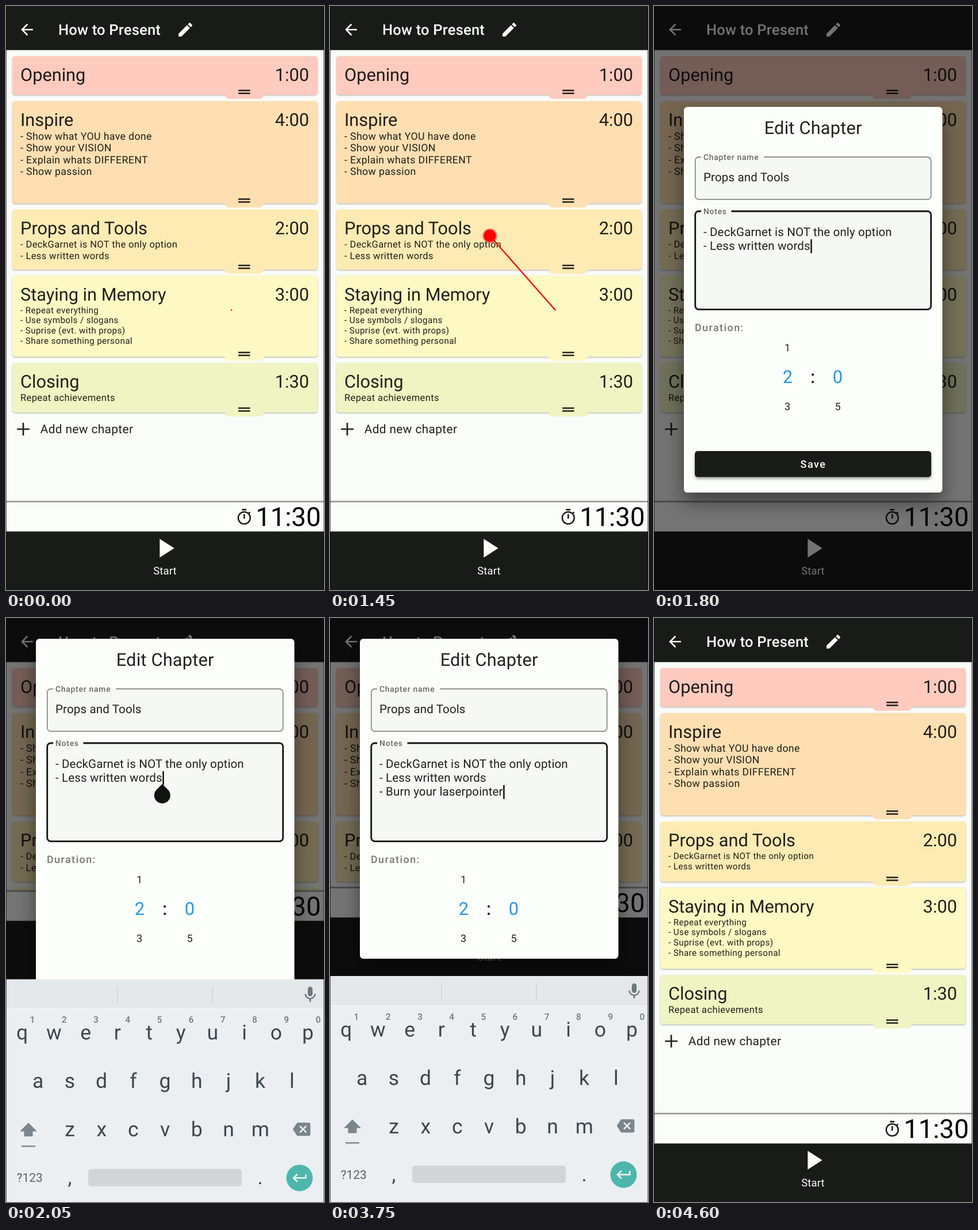
Write an HTML page with a canvas that moves like this. It is 553x1013 px and loops after 4650 ms.

```html
<!DOCTYPE html>
<html lang="en">
<head>
<meta charset="utf-8">
<title>Presentation timer</title>
<style>
html, body { margin: 0; width: 100%; height: 100%; overflow: hidden; background: #191b18; }
canvas { display: block; width: 553px; height: 1013px; }
</style>
</head>
<body>
<canvas id="stage"></canvas>
<script>
const W = 553, H = 1013, LOOP = 4650, STEP = 50, KEYBOARD = 392;
const DARK = '#191b18', LIGHT = '#fbfdfa', INK = 'rgba(0,0,0,.87)';

const canvas = document.getElementById('stage');
const ratio = window.devicePixelRatio || 1;
canvas.width = W * ratio;
canvas.height = H * ratio;
const ctx = canvas.getContext('2d');
ctx.textRendering = 'geometricPrecision';

const icons = {
  back: 'M20 11H7.83l5.59-5.59L12 4l-8 8 8 8 1.41-1.41L7.83 13H20v-2z',
  pencil: 'M3 17.25V21h3.75L17.81 9.94l-3.75-3.75L3 17.25zM20.71 7.04c.39-.39.39-1.02 0-1.41l-2.34-2.34c-.39-.39-1.02-.39-1.41 0l-1.83 1.83 3.75 3.75 1.83-1.83z',
  timer: 'M15 1H9v2h6V1zm-4 13h2V8h-2v6zm8.03-6.61l1.42-1.42c-.43-.51-.9-.99-1.41-1.41l-1.42 1.42C16.07 4.74 14.12 4 12 4c-4.97 0-9 4.03-9 9s4.02 9 9 9 9-4.03 9-9c0-2.12-.74-4.07-1.97-5.61zM12 20c-3.87 0-7-3.13-7-7s3.13-7 7-7 7 3.13 7 7-3.13 7-7 7z',
  play: 'M8 5v14l11-7z',
  handle: 'M20 9H4v2h16V9zM4 15h16v-2H4v2z',
  plus: 'M20.2 13h-7.2v7.2h-2v-7.2H3.8v-2H11V3.8h2V11h7.2v2z',
  mic: 'M12 14c1.66 0 2.99-1.34 2.99-3L15 5c0-1.66-1.34-3-3-3S9 3.34 9 5v6c0 1.66 1.34 3 3 3zm5.3-3c0 3-2.54 5.1-5.3 5.1S6.7 14 6.7 11H5c0 3.41 2.72 6.23 6 6.72V21h2v-3.28c3.28-.48 6-3.3 6-6.72h-1.7z',
  enter: 'M19 7v4H5.83l3.58-3.59L8 6l-6 6 6 6 1.41-1.41L5.83 13H21V7z',
  shift: 'M12 3L0 15h6v7h12v-7h6z',
  erase: 'M22 3H7c-.69 0-1.23.35-1.59.88L0 12l5.41 8.11c.36.53.9.89 1.59.89h15c1.1 0 2-.9 2-2V5c0-1.1-.9-2-2-2zm-3 12.59L17.59 17 14 13.41 10.41 17 9 15.59 12.59 12 9 8.41 10.41 7 14 10.59 17.59 7 19 8.41 15.41 12 19 15.59z'
};
for (const name in icons) icons[name] = new Path2D(icons[name]);

const propsNotes = ['- DeckGarnet is NOT the only option', '- Less written words'];
const newNote = '- Burn your laserpointer';
const chapters = [
  { name: 'Opening', time: '1:00', top: 87, bottom: 154, color: '#fecbbe', notes: [] },
  { name: 'Inspire', time: '4:00', top: 165, bottom: 342.5, color: '#fddfb1', size: 17.7, first: 232, pitch: 20.3,
    notes: ['- Show what YOU have done', '- Show your VISION', '- Explain whats DIFFERENT', '- Show passion'] },
  { name: 'Props and Tools', time: '2:00', top: 353, bottom: 457.5, color: '#fdebb3', size: 16.5, first: 419, pitch: 19.5,
    notes: propsNotes, shrinks: true },
  { name: 'Staying in Memory', time: '3:00', top: 467.5, bottom: 608.5, color: '#fef8c3', size: 15.22, first: 532.5, pitch: 17.85,
    notes: ['- Repeat everything', '- Use symbols / slogans', '- Suprise (evt. with props)', '- Share something personal'] },
  { name: 'Closing', time: '1:30', top: 619, bottom: 705, color: '#f0f4c3', size: 16.5, first: 684.5, pitch: 19.5,
    notes: ['Repeat achievements'] }
];

const clamp = v => Math.max(0, Math.min(1, v));
const mix = (a, b, k) => a + (b - a) * k;
const smooth = k => k * k * (3 - 2 * k);

function text(str, x, y, size, { color = INK, align = 'left', weight = 400, gap = 0 } = {}) {
  ctx.font = `${weight} ${size}px Roboto, sans-serif`;
  ctx.letterSpacing = gap + 'px';
  ctx.textAlign = align;
  ctx.fillStyle = color;
  ctx.fillText(str, x, y);
}

function rect(x, y, w, h, color) {
  ctx.fillStyle = color;
  ctx.fillRect(x, y, w, h);
}

function box(x, y, w, h, r, color) {
  ctx.beginPath();
  ctx.roundRect(x, y, w, h, r);
  ctx.fillStyle = color;
  ctx.fill();
}

function disc(x, y, r, color) {
  ctx.beginPath();
  ctx.arc(x, y, r, 0, 2 * Math.PI);
  ctx.fillStyle = color;
  ctx.fill();
}

function icon(name, x, y, scale, color) {
  ctx.save();
  ctx.translate(x, y);
  ctx.scale(scale, scale);
  ctx.translate(-12, -12);
  ctx.fillStyle = color;
  ctx.fill(icons[name]);
  ctx.restore();
}

function withShadow(color, blur, dy, draw) {
  ctx.save();
  ctx.shadowColor = color;
  ctx.shadowBlur = blur * ratio;
  ctx.shadowOffsetY = dy * ratio;
  draw();
  ctx.restore();
}

function drawChapter(c, saved) {
  const small = saved && c.shrinks;
  const size = small ? 15.22 : c.size;
  const first = small ? 418 : c.first;
  const pitch = small ? 17.85 : c.pitch;
  withShadow('rgba(0,0,0,.28)', 2.5, 1.3, () => box(11, c.top, 531, c.bottom - c.top, 5, c.color));
  box(381, c.bottom - 12, 66.5, 19, [0, 0, 6, 6], c.color);
  icon('handle', 414.3, c.bottom - 5, 1.28, INK);
  text(c.name, 25, c.top + 43, 30.72);
  text(c.time, 527, c.top + 43, 30.72, { align: 'right' });
  c.notes.forEach((line, i) => text(line, 25, first + i * pitch, size, { gap: 0.384 }));
}

function drawApp(inset, saved) {
  rect(0, 0, W, H, '#fafcf9');
  chapters.forEach(c => drawChapter(c, saved));
  icon('plus', 30, 734, 1.33, INK);
  text('Add new chapter', 59.7, 741, 20.8, { gap: 0.4 });

  rect(0, 0, W, 76.5, DARK);
  icon('back', 36.5, 41, 1.3, LIGHT);
  text('How to Present', 91, 50, 25.5, { color: LIGHT, weight: 500, gap: 0.2 });
  icon('pencil', 312, 41, 1.33, LIGHT);

  ctx.save();
  ctx.translate(0, -inset);
  withShadow('rgba(0,0,0,.4)', 3, 0, () => rect(0, 859, W, 52, '#858784'));
  rect(0, 860.8, W, 51, '#fcfefb');
  icon('timer', 414.3, 886.6, 1.3, '#1c1c1c');
  text('11:30', 547.5, 902, 45.5, { color: '#000', align: 'right' });
  rect(0, 911.5, W, H, DARK);
  icon('play', 276.5, 940.5, 2.304, LIGHT);
  text('Start', 276.5, 985.5, 18.4, { color: LIGHT, align: 'center', gap: 0.2 });
  ctx.restore();
}

function drawField(y, h, label, gapEnd, focused) {
  box(71.5, y, 410, h, 6, 'rgba(0,0,0,.022)');
  ctx.save();
  ctx.beginPath();
  ctx.rect(60, y + 4, 440, h + 10);
  ctx.rect(60, y - 4, 22, 8);
  ctx.rect(gapEnd, y - 4, 500 - gapEnd, 8);
  ctx.clip();
  ctx.beginPath();
  ctx.roundRect(71.7, y, 410, h, 6);
  ctx.lineWidth = focused ? 2.8 : 1.4;
  ctx.strokeStyle = focused ? '#141513' : '#70726f';
  ctx.stroke();
  ctx.restore();
  text(label, 86, y + 4.7, 13.8, { color: '#666866', weight: 500, gap: 0.8 });
}

function drawCaret(lines, top, withHandle) {
  const row = lines.length - 1;
  ctx.font = '400 20.5px Roboto, sans-serif';
  ctx.letterSpacing = '0.14px';
  const x = 86 + ctx.measureText(lines[row]).width + 0.5;
  const y = top + 205.5 + row * 24.2;
  rect(x, y, 2.5, 24, '#111');
  if (!withHandle) return;
  const cx = x - 0.5, cy = y + 42, r = 14;
  ctx.beginPath();
  ctx.moveTo(cx, cy - r * Math.SQRT2);
  ctx.arc(cx, cy, r, -Math.PI / 4, Math.PI * 1.25);
  ctx.closePath();
  ctx.fillStyle = '#111310';
  ctx.fill();
}

function drawDialog(alpha, inset, lines, focused, withHandle) {
  const floor = 983 - inset;
  const top = Math.max(36, (36 + floor - 669) / 2);
  const height = Math.min(669, floor - top);
  ctx.save();
  ctx.globalAlpha = alpha;
  withShadow('rgba(0,0,0,.45)', 32, 16, () => box(52, top, 449.5, height, 6, '#fcfefb'));
  ctx.beginPath();
  ctx.roundRect(52, top, 449.5, height, 6);
  ctx.clip();

  text('Edit Chapter', 276.7, top + 46.8, 30.72, { align: 'center', gap: 0.23 });
  drawField(top + 87, 73.5, 'Chapter name', 191, false);
  text('Props and Tools', 86, top + 129.3, 20.5, { gap: 0.14 });
  drawField(top + 181, 170.3, 'Notes', 134.5, focused);
  lines.forEach((line, i) => text(line, 86, top + 223.7 + i * 24.2, 20.5, { gap: 0.14 }));
  if (focused) drawCaret(lines, top, withHandle);

  text('Duration:', 71, top + 388.5, 17.8, { color: '#757775', weight: 500, gap: 1.5 });
  const pick = { align: 'center' };
  const blue = { align: 'center', color: '#2196f3' };
  text('1', 232, top + 424, 18, pick);
  text('2', 232.5, top + 479, 30.72, blue);
  text(':', 276, top + 479, 30.72, { align: 'center', weight: 500 });
  text('0', 319.5, top + 479, 30.72, blue);
  text('3', 232, top + 526, 18, pick);
  text('5', 319.5, top + 526, 18, pick);

  withShadow('rgba(0,0,0,.4)', 5, 3, () => box(71, top + 597, 411, 45, 5, DARK));
  text('Save', 277, top + 626.3, 18, { color: LIGHT, align: 'center', weight: 500, gap: 1.5 });
  ctx.restore();
}

function drawKeyboard(inset) {
  const ink = '#3b474f', soft = '#7a868c', pitch = 55.2;
  ctx.save();
  ctx.translate(0, H - inset);
  rect(0, 0, W, KEYBOARD + 10, '#ebeff2');
  rect(0, 0, W, 51, '#e4e8eb');
  rect(0, 51, W, 1.5, '#f3f6f8');
  rect(193, 12, 1.2, 30, '#c9cdd0');
  rect(358.5, 12, 1.2, 30, '#c9cdd0');
  icon('mic', 529, 26.5, 1.37, '#6d777c');

  const row = (keys, x, y) => [...keys].forEach((key, i) =>
    text(key, x + i * pitch, y, 35.5, { color: ink, align: 'center' }));
  row('qwertyuiop', 28.2, 104.5);
  row('asdfghjkl', 55.7, 188.5);
  row('zxcvbnm', 111, 272.5);
  [...'1234567890'].forEach((n, i) =>
    text(n, 46 + i * pitch, 75.5, 15.5, { color: '#70797f', align: 'center', weight: 500 }));

  icon('shift', 39, 260, 1.25, soft);
  rect(27, 288.3, 24, 2.4, soft);
  icon('erase', 514, 260, 1.28, soft);
  text('?123', 18.5, 351.5, 21, { color: '#56626a' });
  text(',', 111, 355.5, 35, { color: ink, align: 'center' });
  box(143, 329, 267, 30, 5, '#d2d5d7');
  text('.', 442, 355.5, 35, { color: ink, align: 'center' });
  disc(510.5, 344.5, 23, '#4db6ac');
  icon('enter', 511, 344.5, 1.28, '#f4fbfa');
  ctx.restore();
}

// The beam swings twice round an ellipse, then settles on the chapter.
function drawLaser(t) {
  const red = '#ff0000', src = { x: 392.3, y: 528 };
  if (t < 50) {
    disc(src.x - 0.3, src.y - 0.5, 1.2, red);
    disc(279.5, 400, 0.6, 'rgba(255,0,0,.6)');
    return;
  }
  if (t >= 1800) return;
  const angle = Math.PI / 2 + 2 * Math.PI * t / 525;
  const swing = smooth(clamp(t / 150)) * (1 - smooth(clamp((t - 1100) / 300)));
  const x = mix(278, 294 + 187 * Math.cos(angle), swing);
  const y = mix(398.5, 307.5 + 176.5 * Math.sin(angle), swing);
  ctx.beginPath();
  ctx.moveTo(src.x, src.y);
  ctx.lineTo(x, y);
  ctx.lineWidth = 2.3;
  ctx.strokeStyle = red;
  ctx.stroke();
  const glow = ctx.createRadialGradient(x, y, 9.5, x, y, 13.5);
  glow.addColorStop(0, red);
  glow.addColorStop(1, 'rgba(255,0,0,0)');
  disc(x, y, 13.5, glow);
}

function keyboardInset(t) {
  if (t < 3900) return KEYBOARD * (1 - Math.pow(1 - clamp((t - 1800) / 300), 2.35));
  return KEYBOARD * (1 - Math.pow(clamp((t - 3850) / 200), 1.6));
}

function typedLines(t) {
  if (t < 2350) return propsNotes;
  let count;
  if (t < 2800) count = Math.floor((t - 2350) / 100);
  else if (t < 3300) count = Math.min(12, 5 + Math.floor((t - 2800) / 50));
  else count = 13 + Math.floor((t - 3300) / 40);
  return [...propsNotes, newNote.slice(0, count)];
}

function draw(t) {
  ctx.setTransform(ratio, 0, 0, ratio, 0, 0);
  const inset = keyboardInset(t);
  drawApp(inset, t >= 4250);

  const shown = clamp((t - 1470) / 93) * (1 - clamp((t - 4220) / 160));
  if (shown > 0) {
    rect(0, 0, W, H, `rgba(0,0,0,${0.54 * shown})`);
    const focused = t >= 1800 && t < 3950;
    drawDialog(shown, keyboardInset(t - 100), typedLines(t), focused, t >= 1900 && t < 2350);
  }
  if (inset > 0) drawKeyboard(inset);
  rect(0, 0, 1, H, 'rgba(0,0,0,.6)');
  rect(W - 1, 0, 1, H, 'rgba(0,0,0,.5)');
  drawLaser(t);
}

const start = performance.now();
function tick(now) {
  const t = Math.max(0, now - start) % LOOP;
  draw(Math.floor(t / STEP) * STEP);
  requestAnimationFrame(tick);
}
draw(0);
requestAnimationFrame(tick);
</script>
</body>
</html>
```
